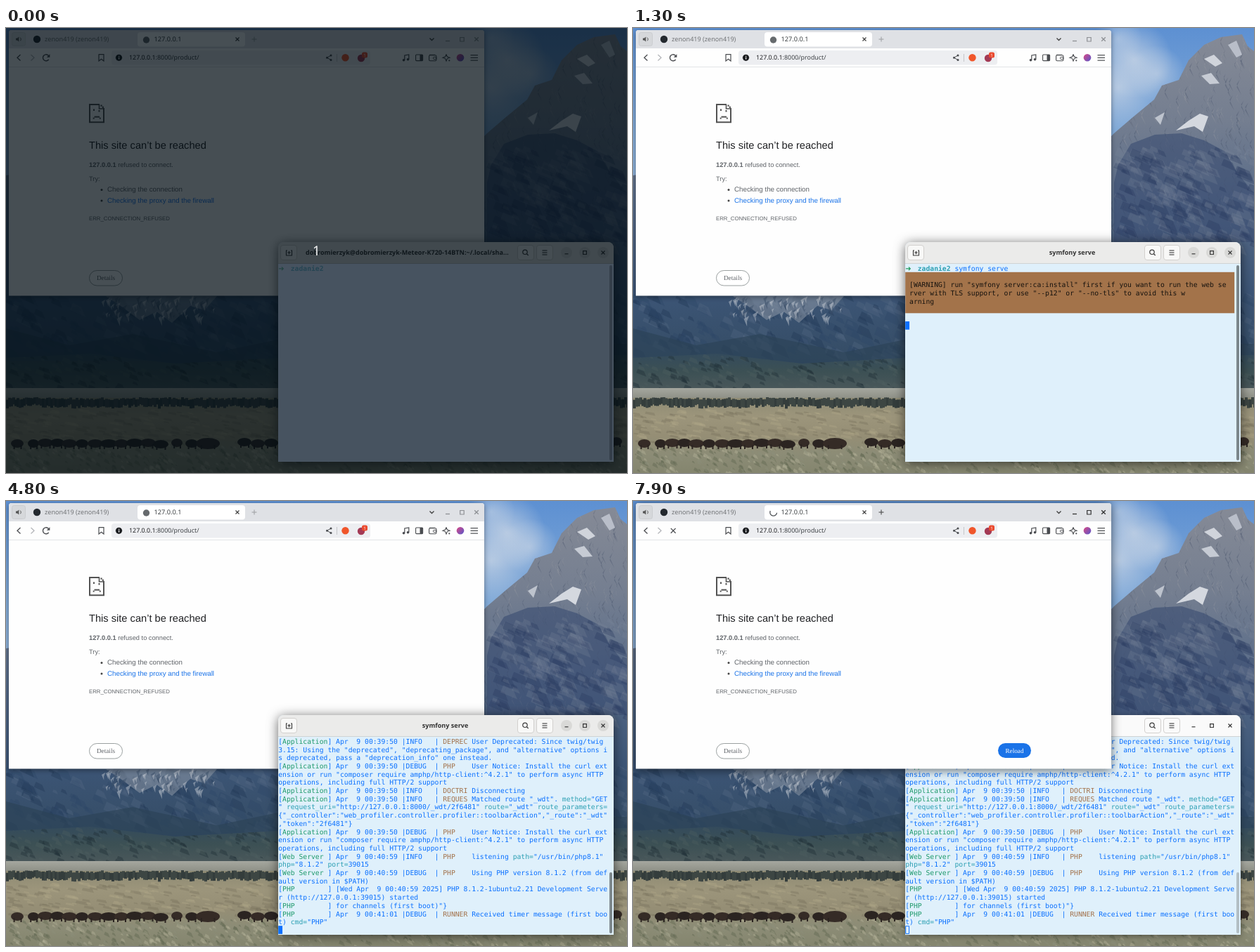
An HTML page with a canvas that plays this animation: 883 by 634 pixels, repeating every 8000 ms.

```html
<!DOCTYPE html>
<html lang="en">
<head>
<meta charset="utf-8">
<title>Starting a local web server</title>
<style>
html, body { margin: 0; width: 100%; height: 100%; overflow: hidden; background: #46566a; }
canvas { display: block; }
</style>
</head>
<body>
<canvas id="stage" width="883" height="634"></canvas>
<script>
const W = 883, H = 634, LOOP = 8000;
const CELL = 5.85, ROW = 11.7, TERM_X = 387.2, TERM_Y = 336.1;
const BLUE = '#0a70ff', GREEN = '#1f9a6c', BROWN = '#a2714a', CYAN = '#2b9fb3';
const UI = '"Noto Sans", sans-serif', PAGE = '"Liberation Sans", sans-serif';
const SERIF = '"Liberation Serif", serif', MONO = '"DejaVu Sans Mono", monospace';

let g = document.getElementById('stage').getContext('2d');
const screen = g;
g.textRendering = 'geometricPrecision';

// ---- drawing helpers ----
function rect(x, y, w, h, color) {
  g.fillStyle = color;
  g.fillRect(x, y, w, h);
}
function box(x, y, w, h, r, fill, stroke, lw = 1) {
  g.beginPath();
  g.roundRect(x, y, w, h, r);
  if (fill) { g.fillStyle = fill; g.fill(); }
  if (stroke) { g.strokeStyle = stroke; g.lineWidth = lw; g.stroke(); }
}
function disc(x, y, r, color) {
  g.fillStyle = color;
  g.beginPath();
  g.arc(x, y, r, 0, 7);
  g.fill();
}
function arc(x, y, r, from, to, color, lw = 1.2) {
  g.strokeStyle = color;
  g.lineWidth = lw;
  g.beginPath();
  g.arc(x, y, r, from, to);
  g.stroke();
}
function trace(pts) {
  g.beginPath();
  for (let i = 0; i < pts.length; i += 2) g.lineTo(pts[i], pts[i + 1]);
}
function line(pts, color, lw = 1.2) {
  trace(pts);
  g.strokeStyle = color;
  g.lineWidth = lw;
  g.stroke();
}
function poly(pts, color) {
  trace(pts);
  g.fillStyle = color;
  g.fill();
}
function cross(x, y, r, color, lw = 1.2) {
  line([x - r, y - r, x + r, y + r], color, lw);
  line([x + r, y - r, x - r, y + r], color, lw);
}
function text(s, x, y, font, color, align = 'left') {
  g.font = font;
  g.fillStyle = color;
  g.textAlign = align;
  g.fillText(s, x, y);
}
function shadowed(blur, alpha, draw) {
  g.save();
  g.shadowColor = `rgba(0,0,0,${alpha})`;
  g.shadowBlur = blur;
  g.shadowOffsetY = 2;
  draw();
  g.restore();
}

// ---- wallpaper ----
let seed = 11;
function rnd() {
  seed = (seed * 16807) % 2147483647;
  return seed / 2147483647;
}
function fade(y0, y1, ...colors) {
  const f = g.createLinearGradient(0, y0, 0, y1);
  colors.forEach((c, i) => f.addColorStop(i / (colors.length - 1), c));
  return f;
}
// Scattered slanted flakes that give rock, forest and grass their grain.
function grain(n, x, y, w, h, size, colors, slant = 0.5) {
  for (let i = 0; i < n; i++) {
    const px = x + rnd() * w, py = y + rnd() * h, s = size * (0.4 + rnd());
    const c = colors[Math.floor(rnd() * colors.length)];
    poly([px, py, px + s * slant, py + s * 0.3, px + s * (slant + 0.3), py + s, px - s * 0.2, py + s * 0.5], c);
  }
}
function cloud(x, y, r, alpha) {
  const f = g.createRadialGradient(x, y, 0, x, y, r);
  f.addColorStop(0, `rgba(205,216,230,${alpha})`);
  f.addColorStop(1, 'rgba(205,216,230,0)');
  disc(x, y, r, f);
}
function clipped(pts, color, draw) {
  g.save();
  poly(pts, color);
  g.clip();
  draw();
  g.restore();
}
function paintWallpaper() {
  rect(0, 0, W, H, fade(0, 300, '#5d90d2', '#83abd8', '#9bb8d8'));
  cloud(712, 45, 55, 0.75);
  cloud(745, 65, 40, 0.6);
  cloud(690, 85, 60, 0.7);
  cloud(690, 15, 34, 0.5);

  clipped([0, 210, 120, 190, 400, 230, 660, 175, 684, 150, 712, 126, 741, 102, 752, 82, 776, 74, 790, 46,
    812, 24, 836, 13, 866, 9, 874, 26, 883, 33, 883, 520, 0, 520],
    fade(10, 500, '#858a96', '#747e90', '#566a88', '#3c5576', '#334a60'), () => {
      grain(420, 680, 10, 203, 300, 17, ['rgba(60,72,98,.32)', 'rgba(165,165,168,.25)', 'rgba(90,98,116,.35)'], -0.2);
      poly([690, 195, 708, 165, 742, 152, 780, 150, 812, 160, 842, 176, 858, 205, 883, 235, 883, 305, 684, 305, 684, 220],
        'rgba(58,76,112,.6)');
      grain(230, 684, 165, 199, 145, 16, ['rgba(40,58,94,.35)', 'rgba(120,132,152,.25)'], 0.7);
      poly([772, 146, 790, 132, 806, 122, 818, 126, 810, 148, 798, 140], '#d4d8df');
      poly([812, 44, 826, 38, 838, 50, 828, 55], '#d0d4db');
      poly([808, 68, 822, 64, 834, 79, 820, 80], '#c6cbd4');
      poly([846, 24, 858, 18, 866, 38, 858, 42], '#b9bec9');
      poly([742, 128, 756, 120, 750, 138], '#bdc3cd');
      // slopes below
      grain(420, 0, 375, W, 85, 17, ['rgba(34,56,86,.4)', 'rgba(86,108,134,.3)', 'rgba(46,72,104,.4)'], 0.6);
      poly([142, 382, 300, 382, 282, 402, 262, 396, 236, 420, 214, 404, 190, 416, 166, 398], 'rgba(140,151,166,.55)');
      grain(90, 140, 380, 160, 32, 11, ['rgba(205,209,215,.45)', 'rgba(60,80,106,.5)'], -0.5);
      poly([0, 428, 90, 452, 180, 436, 300, 462, 386, 444, 883, 450, 883, 520, 0, 520], 'rgba(44,66,86,.65)');
    });

  clipped([0, 470, 120, 464, 240, 478, 386, 470, 883, 466, 883, 514, 0, 514],
    fade(464, 514, '#344b5c', '#3c5054', '#49575a'), () => {
      grain(450, 0, 464, W, 50, 8, ['rgba(32,46,54,.4)', 'rgba(82,96,96,.3)'], 0.8);
    });
  rect(0, 513, W, 15, fade(513, 528, '#a5a79f', '#8d8f85'));
  rect(0, 527, W, 107, fade(527, 634, '#8f8b74', '#9c957b', '#958e75', '#8c8c76', '#84856e'));
  for (let x = 0; x < W; x += 3) rect(x, 526 + rnd() * 4, 4, 9 + rnd() * 4, rnd() < 0.5 ? '#343d3c' : '#3d4643');
  grain(600, 0, 542, W, 48, 5, ['rgba(178,168,138,.35)', 'rgba(112,107,86,.3)'], 2);
  grain(850, 0, 592, W, 42, 7, ['rgba(182,180,154,.4)', 'rgba(98,104,82,.45)', 'rgba(140,142,122,.4)'], 0.5);

  const herd = [16, 592, 9, 39, 592, 8, 56, 591, 11, 73, 591, 10, 90, 592, 11, 108, 592, 9, 127, 592, 11,
    146, 592, 12, 164, 592, 10, 183, 591, 12, 202, 591, 11, 220, 593, 11, 243, 591, 8, 264, 592, 9,
    287, 592, 17, 339, 590, 10, 358, 592, 10, 377, 591, 10, 868, 589, 8];
  for (let i = 0; i < herd.length; i += 3) {
    const [x, y, r] = herd.slice(i, i + 3);
    g.fillStyle = i % 2 ? '#2b2421' : '#352b26';
    g.beginPath();
    g.ellipse(x, y, r, r > 15 ? 8 : 6, 0, 0, 7);
    g.fill();
    rect(x - r * 0.6, y + 2, 2, 6, '#2b2421');
    rect(x + r * 0.5, y + 2, 2, 6, '#2b2421');
  }
}
const wallpaper = document.createElement('canvas');
wallpaper.width = W;
wallpaper.height = H;
g = wallpaper.getContext('2d');
paintWallpaper();
g = screen;

// ---- browser ----
function tabStrip(t, active) {
  const dim = active ? '#333' : '#8e9094';
  box(4, 3, 676, 26, [4, 4, 0, 0], '#dfe1e5');
  box(8.5, 6.5, 19, 19, 3, '#d6d8db', '#cacccf');
  poly([14, 14.5, 16, 14.5, 18.3, 12.5, 18.3, 19.5, 16, 17.5, 14, 17.5], '#555');
  arc(18.5, 16, 2.8, -1, 1, '#555', 1);
  disc(44, 16, 5.2, '#24292f');
  text('zenon419 (zenon419)', 55, 19.4, '9.1px ' + UI, '#727477');
  box(187, 6, 153, 20.5, 4, '#fff');
  if (t < 7700) {
    disc(199.5, 17, 4.7, '#666a6d');
  } else {
    const from = t < 7900 ? 1.2 : 0.1;
    arc(199.7, 16.3, 4.9, from, from + 3.5, '#4f5357', 1.3);
  }
  text('127.0.0.1', 210.5, 19.4, '9.2px ' + UI, '#3c4043');
  cross(329, 16, 2.5, '#444', 1.3);
  const plus = active ? '#555' : '#a5a7aa';
  line([349.5, 16, 356.5, 16], plus);
  line([353, 12.5, 353, 19.5], plus);
  line([602.5, 14.5, 605.5, 17.5, 608.5, 14.5], '#444', 1.4);
  line([625, 18.5, 631, 18.5], dim, 1.3);
  box(645.7, 13.5, 5.5, 5.5, 0, null, dim, 1.2);
  cross(669, 16, 2.8, dim, 1.3);
}
function toolbar(t) {
  const ink = '#4a4c50';
  line([20.5, 38, 16, 42.2, 20.5, 46.5], ink, 1.3);
  line([35.5, 38, 40, 42.2, 35.5, 46.5], '#b4b6ba', 1.3);
  if (t < 7700) {
    arc(57, 42.3, 4.5, 0.6, 5.6, ink, 1.4);
    poly([62.4, 37.2, 62.4, 41.8, 57.8, 41.8], ink);
  } else {
    cross(57.2, 42.3, 3.4, ink, 1.3);
  }
  line([132, 37.7, 139, 37.7, 139, 47, 135.5, 44.2, 132, 47, 132, 37.2], ink);
  box(150, 32, 368, 20.5, 4, '#edeef1');
  disc(160.5, 42.3, 4.6, '#1d1f22');
  rect(160, 41.7, 1.2, 2.8, '#fff');
  rect(160, 39.8, 1.2, 1.1, '#fff');
  text('127.0.0.1', 175, 45.4, '8.9px ' + UI, '#202124');
  const hostWidth = g.measureText('127.0.0.1').width;
  text(':8000/product/', 175 + hostWidth, 45.4, '8.9px ' + UI, '#3f4347');
  line([462, 39, 456.5, 42.3, 462, 45.6], ink, 1);
  for (const [x, y] of [[462, 39], [456.5, 42.3], [462, 45.6]]) disc(x, y, 1.5, ink);
  rect(470, 37, 1, 11, '#c4c6c9');
  disc(482.5, 42.2, 5.2, '#f0562b');
  disc(505, 43, 5.2, '#a33a55');
  box(506, 34.5, 8, 8, 2.5, '#ea4a2f');
  text('1', 510, 41, '6px ' + UI, '#fff', 'center');

  disc(565.5, 45.8, 1.8, ink);
  disc(571.5, 44.8, 1.8, ink);
  line([566.8, 45.8, 566.8, 39, 572.8, 38, 572.8, 44.8], ink);
  box(582.6, 38, 10, 8.6, 1, null, ink, 1.1);
  rect(588.5, 38, 4, 8.6, ink);
  box(601.6, 38.8, 10.3, 8, 1.5, null, ink, 1.1);
  line([602, 38.4, 610, 38.4], ink);
  box(607.5, 41.4, 4.4, 3, 1, null, ink, 1);
  line([626, 37.5, 627.4, 41, 631, 42.3, 627.4, 43.6, 626, 47, 624.6, 43.6, 621, 42.3, 624.6, 41, 626, 37.5], ink, 1.1);
  disc(630.3, 46.3, 1.1, ink);
  const orb = g.createLinearGradient(641, 38, 651, 47);
  orb.addColorStop(0, '#d44a88');
  orb.addColorStop(1, '#5b55c8');
  disc(646, 42.3, 5.3, orb);
  for (const y of [38.7, 42.4, 46.1]) line([660.5, y, 671, y], ink, 1.2);
}
function errorPage() {
  const ink = '#535353', grey = '#5f6368';
  line([133, 109, 119, 109, 119, 134.2, 139, 134.2, 139, 114], ink, 2);
  line([132.5, 109, 132.5, 115, 139, 115], ink, 1.6);
  rect(134.5, 109.5, 2.2, 2.2, ink);
  rect(136.7, 111.7, 2.2, 2.2, ink);
  rect(124, 115.5, 2, 2.5, ink);
  rect(131.5, 117, 2, 2.5, ink);
  rect(125.5, 125.6, 7.5, 2, ink);
  rect(123.7, 127.6, 2, 2, ink);
  rect(132.8, 127.6, 2, 2, ink);

  text('This site can’t be reached', 118, 172.4, '14.65px ' + PAGE, '#202124');
  text('127.0.0.1', 118, 197.8, 'bold 9.25px ' + PAGE, grey);
  const hostWidth = g.measureText('127.0.0.1').width;
  text(' refused to connect.', 118 + hostWidth, 197.8, '9.25px ' + PAGE, grey);
  text('Try:', 118, 217.8, '9.25px ' + PAGE, grey);
  disc(136, 230.4, 1.5, '#444');
  disc(136, 246, 1.5, '#444');
  text('Checking the connection', 144, 233.4, '9.77px ' + PAGE, grey);
  text('Checking the proxy and the firewall', 144, 249.2, '9.77px ' + PAGE, '#1a73e8');
  text('ERR_CONNECTION_REFUSED', 118, 273.7, '7.81px ' + PAGE, grey);
  box(118.5, 345.5, 47, 21.5, 10.7, '#fff', '#9aa0a0');
  text('Details', 142, 359, '9.2px ' + SERIF, grey, 'center');
  box(519, 345, 47, 21, 10.5, '#1a73e8');
  text('Reload', 542.5, 358.6, '9.2px ' + SERIF, '#fff', 'center');
}
function browser(t, active) {
  shadowed(active ? 14 : 7, active ? 0.55 : 0.4, () => box(4, 3, 676, 378.5, [4, 4, 0, 0], '#fefefe'));
  tabStrip(t, active);
  toolbar(t);
  rect(4, 55, 676, 1, '#e2e4e6');
  errorPage();
}

// ---- terminal ----
const TITLE = 'dobromierzyk@dobromierzyk-Meteor-K720-14BTN:~/.local/sha…';
const COMMAND = 'symfony serve';
const WARNING = [
  '[WARNING] run "symfony server:ca:install" first if you want to run the web se',
  'rver with TLS support, or use "--p12" or "--no-tls" to avoid this w',
  'arning'];
const FOLLOWING = [
  'Following Web Server log file (/home/dobromierzyk/.symfony5/log/9777eca0b948a014',
  '674d86f6332c0fbd5222d9ca.log)',
  'Following PHP log file (/home/dobromierzyk/.symfony5/log/9777eca0b948a014674d86f',
  '6332c0fbd5222d9ca/7daf403c7589f4927632ed3b6af762a992f09b78.log)'];
const entry = (source, time, level, channel, message) =>
  `[${source.padEnd(11)}] Apr  9 00:${time} |${level.padEnd(7)}| ${channel.padEnd(6)} ${message}`;
const NOTICE = [
  entry('Application', '39:50', 'DEBUG', 'PHP', 'User Notice: Install the curl ext'),
  'ension or run "composer require amphp/http-client:^4.2.1" to perform async HTTP',
  'operations, including full HTTP/2 support'];
const LOG = [
  entry('Application', '39:50', 'INFO', 'DEPREC', 'User Deprecated: Since twig/twig'),
  '3.15: Using the "deprecated", "deprecating_package", and "alternative" options i',
  's deprecated, pass a "deprecation_info" one instead.',
  ...NOTICE,
  entry('Application', '39:50', 'INFO', 'DOCTRI', 'Disconnecting'),
  entry('Application', '39:50', 'INFO', 'REQUES', 'Matched route "_wdt". method="GET'),
  '" request_uri="http://127.0.0.1:8000/_wdt/2f6481" route="_wdt" route_parameters=',
  '{"_controller":"web_profiler.controller.profiler::toolbarAction","_route":"_wdt"',
  ',"token":"2f6481"}',
  ...NOTICE,
  entry('Web Server', '40:59', 'INFO', 'PHP', 'listening path="/usr/bin/php8.1"'),
  'php="8.1.2" port=39015',
  entry('Web Server', '40:59', 'DEBUG', 'PHP', 'Using PHP version 8.1.2 (from def'),
  'ault version in $PATH)',
  '[PHP        ] [Wed Apr  9 00:40:59 2025] PHP 8.1.2-1ubuntu2.21 Development Serve',
  'r (http://127.0.0.1:39015) started',
  '[PHP        ] for channels (first boot)"}',
  entry('PHP', '41:01', 'DEBUG', 'RUNNER', 'Received timer message (first boo'),
  't) cmd="PHP"'];
const RULES = [
  [GREEN, /(?<=^\[)[A-Z][^\]]*(?=\])|(?<=^Following )(Web Server|PHP)/g],
  [BROWN, /(?<=\| )[A-Z]{3,6}\b/g],
  [CYAN, /\b[a-z]+(_[a-z]+)?=/g]];

const rowY = row => TERM_Y + row * ROW;
const colX = col => TERM_X + col * CELL;

function cells(s, col, row, colors, weight = '') {
  for (let i = 0; i < s.length; i++) {
    if (s[i] === ' ') continue;
    const color = Array.isArray(colors) ? colors[i] : colors;
    text(s[i], colX(col + i), rowY(row) + 9.7, `${weight} 9.72px ${MONO}`, color);
  }
}
function logLines(lines, firstRow) {
  lines.forEach((s, n) => {
    const colors = Array(s.length).fill(BLUE);
    for (const [color, rule] of RULES)
      for (const m of s.matchAll(rule)) colors.fill(color, m.index, m.index + m[0].length);
    cells(s, 0, firstRow + n, colors);
  });
}
function cursor(col, row) {
  rect(colX(col), rowY(row), CELL, ROW, BLUE);
}
function header(t, active) {
  const ink = '#3a3a3a', edge = '#d2d0ce';
  box(387, 305, 477, 31, [8, 8, 0, 0], active ? '#ebebea' : '#fafafa');
  rect(387, 335, 477, 1, '#d0d3d4');
  for (const x of [390.5, 727.5, 754.5]) box(x, 309.5, 23, 21, 3.5, active ? '#f8f8f7' : '#fafafa', edge);
  line([400, 317, 398.5, 317, 398.5, 324, 406.5, 324, 406.5, 317, 405, 317], ink, 1.1);
  line([400.3, 320, 404.7, 320], ink, 1.1);
  line([402.5, 317.8, 402.5, 322.2], ink, 1.1);
  arc(738, 319.3, 3.2, 0, 7, ink, 1.2);
  line([740.3, 321.6, 742.7, 324], ink, 1.3);
  for (const y of [317, 320, 323]) line([762.5, y, 769.5, y], ink, 1.1);
  if (active) for (const x of [797, 823, 849]) disc(x, 320, 8, '#d9d9d7');
  line([794.5, 321.8, 799.5, 321.8], ink, 1.2);
  box(820.6, 317.7, 4.8, 4.8, 0, null, ink, 1.2);
  cross(849, 320, 2.5, ink, 1.3);
  const bold = 'bold 9.05px ' + UI;
  if (t < 1300) text(TITLE, 426, 323.3, bold, '#333');
  else text(COMMAND, 624.5, 323.3, bold, active ? '#333' : '#999', 'center');
}
function session(t) {
  text('➜', TERM_X, rowY(0) + 9.7, 'bold 10px "DejaVu Sans", sans-serif', '#1f9a5c');
  cells('zadanie2', 3, 0, CYAN, 'bold');
  const typed = t < 400 ? 0 : t < 500 ? 3 : t < 700 ? 5 : COMMAND.length;
  cells(COMMAND.slice(0, typed), 12, 0, BLUE);
  if (typed && t < 1300) cursor(12 + typed, 0);
  if (t < 1300) return;
  rect(TERM_X, rowY(1), 80 * CELL, 5 * ROW, '#a3734a');
  WARNING.forEach((s, i) => cells(s, 1, 2 + i, '#17130f'));
  if (t < 1500) return cursor(0, 7);
  logLines(FOLLOWING, 7);
  if (t < 1900 || (t >= 2400 && t < 3000)) cursor(0, 11);
}
function log(t) {
  logLines(LOG, 0);
  if (t < 3600) rect(colX(15), rowY(8) + 10.6, 33 * CELL, 1, BLUE);
  const lit = t < 4200 || (t >= 4800 && t < 5400) || t >= 6000;
  if (t >= 6600) box(colX(0) + 0.5, rowY(23) + 0.5, CELL - 1, ROW - 1, 0, null, BLUE);
  else if (t >= 3600 && lit) cursor(0, 23);
}
function terminal(t, active) {
  shadowed(active ? 16 : 8, active ? 0.6 : 0.4, () => box(387, 305, 477, 313, [8, 8, 0, 0], '#dff0fb'));
  header(t, active);
  const top = t < 3500 ? 338 : 529;
  box(858, top, 4, 616 - top, 2, active ? '#7c878c' : '#b3bfc5');
  if (t < 3500) session(t);
  else log(t);
}

// ---- timeline ----
function draw(t) {
  g.drawImage(wallpaper, 0, 0);
  if (t < 6700) {
    browser(t, false);
    terminal(t, true);
  } else {
    terminal(t, false);
    browser(t, true);
  }
  if (t < 100) {
    rect(0, 0, W, H, 'rgba(0,12,18,.72)');
    rect(387, 336, 477, 282, 'rgba(92,102,126,.3)');
    text('1', 441.5, 323.7, '19px "Open Sans", sans-serif', '#fff', 'center');
  }
}
function tick() {
  draw(performance.now() % LOOP);
  requestAnimationFrame(tick);
}
tick();
</script>
</body>
</html>
```
